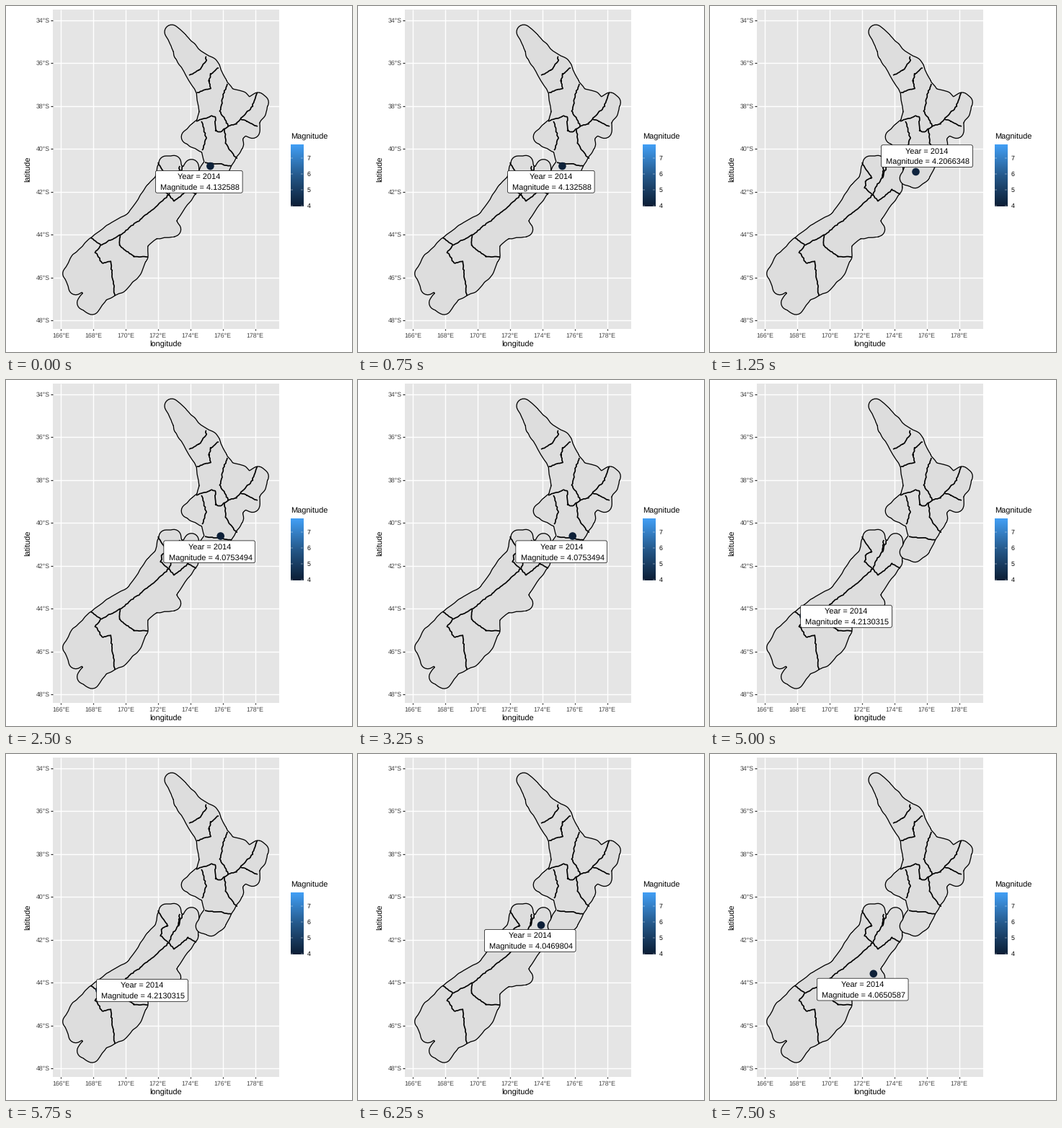
Animation of 480x480 px, one loop 8 s. Source, as a matplotlib script:

```python
import numpy as np
import matplotlib.pyplot as plt
from matplotlib.animation import FuncAnimation
from matplotlib.colors import LinearSegmentedColormap
from matplotlib.patches import Circle, FancyBboxPatch, Polygon, Rectangle

SIZE, DPI = 480, 72          # at 72 dpi one point is one pixel
STEP, HOLD, FRAMES = 250, 1250, 32
GREY, LAND, TICK, TICK_TEXT = "#e5e5e5", "#dddddd", "#2b2b2b", "#444444"
BUFFER, COAST = 10, 1.3      # coast distance from the island core, line width

plt.rcParams["font.family"] = "Liberation Sans"
plt.rcParams["text.hinting"] = "none"
rng = np.random.default_rng(4)

fig = plt.figure(figsize=(SIZE / DPI, SIZE / DPI), dpi=DPI, facecolor="white")
ax = fig.add_axes([0, 0, 1, 1])


def line(xs, ys, color, width, z=1):
    ax.plot(xs, ys, color=color, lw=width, zorder=z, solid_capstyle="butt",
            solid_joinstyle="round")


def label(x, y, s, size=11, color="black", ha="left", z=5, **kw):
    return ax.text(x, y, s, fontsize=size, color=color, ha=ha,
                   va="baseline", zorder=z, **kw)


def rough(points, step, wobble):
    """Split a polyline into short steps and shake the inner points."""
    p = np.array(points, float)
    dist = np.r_[0, np.cumsum(np.hypot(*np.diff(p, axis=0).T))]
    s = np.union1d(dist, np.arange(0, dist[-1], step))
    path = np.column_stack([np.interp(s, dist, p[:, k]) for k in (0, 1)])
    path[1:-1] += rng.uniform(-wobble, wobble, (len(s) - 2, 2))
    return path


def island(*core):
    """Grow the core by a round buffer, which gives a scalloped coast."""
    path = rough(core + core[:1], 7, 0.8)
    for color, extra in (("black", COAST), (LAND, -COAST)):
        ax.add_patch(Polygon(path, facecolor=LAND, edgecolor=color,
                             lw=2 * BUFFER + extra, joinstyle="round",
                             zorder=2))


def border(*points):
    line(*rough(points, 2.5, 0.8).T, "black", 1.7, 3)


# Panel, grid and axes
LEFT, RIGHT, TOP, BOTTOM = 65, 379, 5.4, 447.6
ax.add_patch(Rectangle((LEFT, TOP), RIGHT - LEFT, BOTTOM - TOP,
                       facecolor=GREY, lw=0, zorder=0))
for i in range(7):
    x = 76 + 44.93 * i
    line([x, x], [TOP, BOTTOM], "white", 1.4)
    line([x, x], [BOTTOM, BOTTOM + 2.8], TICK, 1.2)
    label(x, 460, f"{166 + 2 * i}°E", 8.8, TICK_TEXT, "center")
for i in range(8):
    y = 19.6 + 59.5 * i
    line([LEFT, RIGHT], [y, y], "white", 1.4)
    line([LEFT - 2.8, LEFT], [y, y], TICK, 1.2)
    label(60.8, y + 3.1, f"{34 + 2 * i}°S", 8.8, TICK_TEXT, "right")
label(221.8, 473, "longitude", ha="center")
ax.text(36.4, 226.4, "latitude", fontsize=11, rotation=90, ha="right",
        va="center", zorder=5)

# South island, then north island
island((222, 218), (232, 218), (236, 232), (254, 232), (257, 222),
       (258, 230), (255, 240), (257, 252), (231, 288), (224, 298),
       (232, 310), (205, 313), (187, 328), (187, 347), (178, 367),
       (158, 388), (133, 399), (119, 418), (108, 411), (120, 398),
       (108, 384), (97, 390), (89, 371), (100, 352), (124, 329),
       (147, 312), (176, 295), (203, 256), (215, 243))
island((230, 36), (241, 45), (266, 72), (284, 81), (296, 106), (308, 123),
       (326, 128), (335, 138), (349, 130), (354, 133), (351, 146),
       (341, 160), (342, 173), (330, 168), (319, 180), (319, 192),
       (309, 209), (295, 235), (284, 242), (274, 238), (286, 216),
       (280, 196), (266, 189), (254, 181), (262, 173), (274, 163),
       (278, 148), (274, 117), (243, 66), (240, 55))

# Regional borders, north
border((254, 96), (268, 89), (278, 75), (277, 70))
border((265, 120), (284, 114), (282, 104), (284, 94), (295, 86))
border((307, 108), (302, 121), (297, 146), (309, 167), (320, 163),
       (342, 139), (348, 120))
border((325, 157), (334, 160), (349, 167))
border((264, 160), (284, 153), (290, 153), (291, 173), (297, 175),
       (309, 167))
border((271, 160), (278, 184), (272, 200))
border((303, 171), (305, 192), (320, 212))
border((276, 217), (302, 220), (313, 222))

# Regional borders, south
border((211, 217), (224, 238), (216, 243), (215, 253), (226, 262))
border((241, 222), (239, 238), (231, 250), (226, 262))
border((245, 222), (239, 239))
border((226, 262), (233, 271), (252, 255), (264, 261))
border((226, 262), (203, 283), (158, 318), (131, 332), (118, 321))
border((158, 318), (157, 332), (178, 348), (197, 348))
border((131, 332), (124, 342), (134, 357), (145, 354), (151, 402))

# Colour legend
blues = LinearSegmentedColormap.from_list(
    "blues", ["#0c1e35", "#25598b", "#429ff5"])
label(395, 185, "Magnitude")
ax.imshow(np.linspace(1, 0, 256)[:, None], cmap=blues, aspect="auto",
          extent=(395, 412.2, 277.6, 191.6), zorder=2)
for value in range(4, 8):
    y = 277.2 - 22.2 * (value - 4)
    line([395, 398.4], [y, y], "white", 0.4, 3)
    line([408.8, 412.2], [y, y], "white", 0.4, 3)
    label(417.8, y + 3.2, str(value), 8.8)

# Quakes: dot x, dot y, label centre x, label top, magnitude
quakes = [
    (283.4, 222.1, 267.8, 228.4, "4.132588"),
    (285.5, 230, 301, 192.8, "4.2066348"),
    (297.7, 216.5, 282.2, 222.9, "4.0753494"),
    (358.2, 145.2, 289, 129.5, "4.1448273"),
    (129.3, 327.4, 189, 312.5, "4.2130315"),
    (254, 237.4, 238.7, 243.6, "4.0469804"),
    (226.8, 304.8, 211.7, 311.2, "4.0650587"),
]
dot = Circle((0, 0), 5.3, lw=0, zorder=6)
box = FancyBboxPatch((0, 0), 1, 1, boxstyle="round,pad=0,rounding_size=2.2",
                     facecolor="white", edgecolor="black", lw=0.7, zorder=7)
ax.add_patch(dot)
ax.add_patch(box)
year_text = label(0, 0, "Year = 2014", ha="center", z=8)
size_text = label(0, 0, "", ha="center", z=8)

ax.set_xlim(0, SIZE)
ax.set_ylim(SIZE, 0)
ax.axis("off")


def draw(frame):
    x, y, cx, top, mag = quakes[frame * STEP // HOLD]
    dot.center = x, y
    dot.set_facecolor(blues((float(mag) - 4) / 3.85))
    width = 71.8 + 6.1 * len(mag)
    box.set_bounds(cx - width / 2, top, width, 30.8)
    year_text.set_position((cx, top + 11.6))
    size_text.set_position((cx + 1.5, top + 27.4))
    size_text.set_text(f"Magnitude = {mag}")
    return dot, box, year_text, size_text


anim = FuncAnimation(fig, draw, frames=FRAMES, interval=STEP, repeat=True,
                     repeat_delay=0)
plt.show()
```
